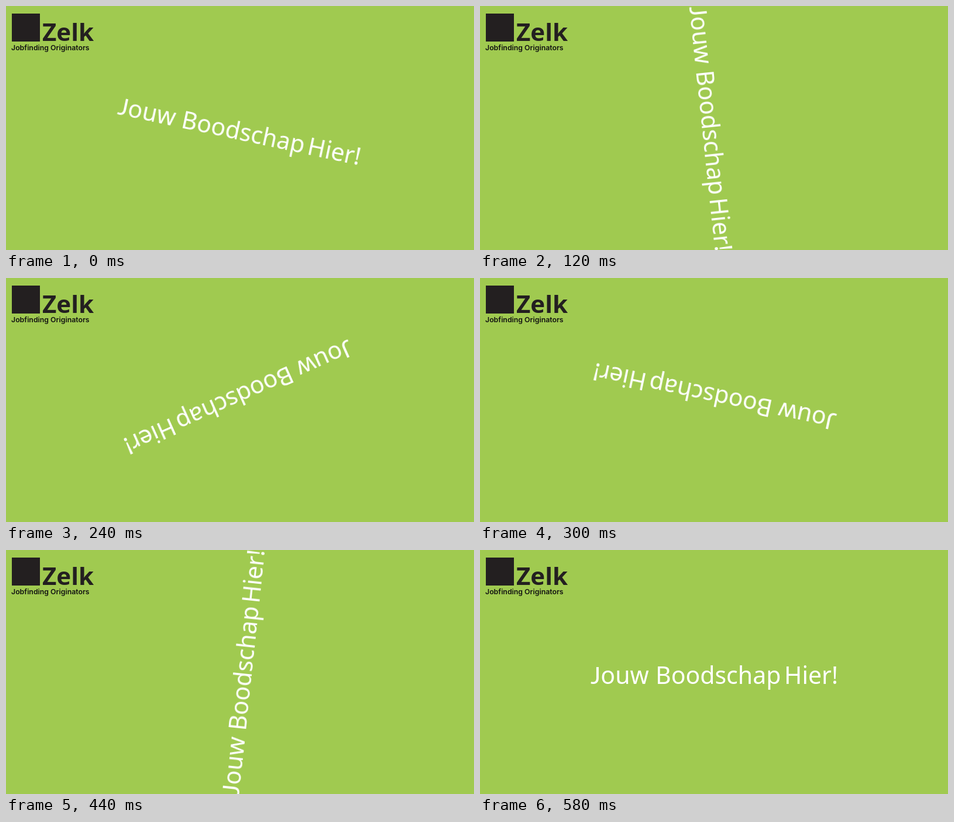
Recreate the animation shown at these times as an HTML page. Size 800 by 419 pixels, loop 2980 ms.

```html
<!DOCTYPE html>
<html lang="nl">
<head>
<meta charset="utf-8">
<title>Jouw Boodschap Hier!</title>
<style>
  html, body { margin: 0; width: 100%; height: 100%; overflow: hidden; background: #a0ca50; }
  svg { display: block; width: 800px; height: 419px; }
  .brand { fill: #231f20; }
  .name { font: 700 42px "Noto Sans", sans-serif; }
  .tagline { font: 600 12.3px Inter, sans-serif; fill: #111; }
  .message {
    font: 41px "Noto Sans", sans-serif;
    fill: #fff;
    transform-origin: 400px 209.5px;
    animation: spin 2980ms infinite;
  }
  .hook { font-family: Lato, sans-serif; }

  /* One turn in 12deg jumps every 20ms, then a long rest */
  @keyframes spin {
    0% { transform: rotate(12deg); animation-timing-function: steps(29, end); }
    19.463%, 100% { transform: rotate(360deg); }
  }
</style>
</head>
<body>
<svg viewBox="0 0 800 419">
  <g class="brand">
    <rect x="10" y="13" width="48" height="48"/>
    <text class="name" x="62" y="60">Zelk</text>
    <text class="tagline" x="9" y="76">Jobfinding Originators</text>
  </g>
  <g class="message">
    <text x="189" y="229.5"><tspan class="hook">J</tspan>ouw</text>
    <text x="300" y="229.5">Boodschap</text>
    <text x="520" y="229.5">Hier!</text>
  </g>
</svg>
</body>
</html>
```
